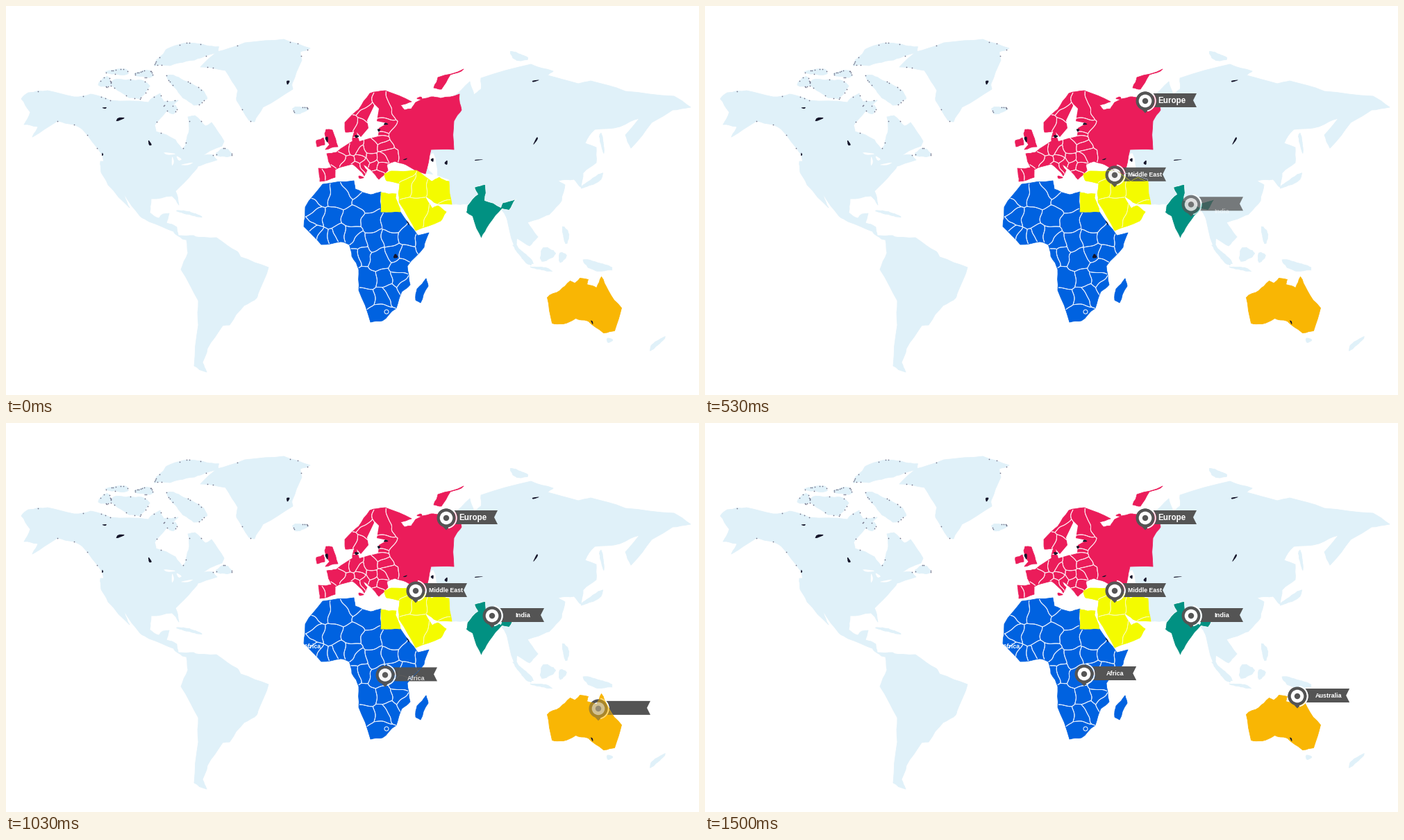
Animation, 998 px wide and 561 px high, one loop 5.01 s. Source, as a matplotlib script:

```python
import random

import matplotlib.pyplot as plt
import numpy as np
from matplotlib.animation import FuncAnimation
from matplotlib.collections import LineCollection, PolyCollection
from matplotlib.patches import Circle, Polygon
from matplotlib.path import Path
from matplotlib.transforms import Affine2D

W, H, DPI = 998, 561, 128
LOOP_MS, STEP_MS = 5010, 30
RISE_MS, RISE_PX, STAGGER = 480, 35, 124
PT = 72 / DPI
PALE, RED, BLUE, YELLOW = "#e0f1f9", "#eb1c5a", "#0062e0", "#f4fb00"
TEAL, AMBER, GREY, DARK = "#019182", "#f9b604", "#545454", "#15152a"
random.seed(4)

# Coastlines, in pixels with y pointing down
CANADA = [
    (22, 134), (32, 125), (60, 122), (98, 131), (122, 127), (150, 136), (205, 139),
    (222, 126), (227, 138), (248, 136), (230, 153), (214, 172), (216, 181),
    (244, 193), (254, 207), (258, 202), (263, 183), (262, 160), (272, 158),
    (287, 173), (296, 168), (314, 195), (311, 202), (278, 217), (298, 215),
    (304, 222), (272, 232), (140, 232), (138, 214), (110, 178), (98, 171),
    (74, 166), (38, 189), (46, 174), (26, 171), (35, 153)]
MEXICO = [
    (136, 224), (280, 226), (268, 242), (244, 267), (249, 287), (239, 274),
    (209, 278), (207, 298), (220, 306), (226, 300), (235, 299), (231, 313),
    (246, 319), (248, 331), (270, 331), (276, 336), (254, 336), (241, 325),
    (206, 311), (193, 303), (170, 271), (178, 291), (147, 258), (137, 240)]
SOUTH_AMERICA = [
    (260, 338), (268, 332), (303, 334), (333, 354), (338, 362), (378, 377),
    (365, 410), (361, 421), (343, 432), (322, 460), (312, 461), (290, 494),
    (283, 514), (289, 528), (271, 519), (277, 460), (277, 425), (252, 380),
    (262, 356)]
GREENLAND = [
    (280, 88), (304, 66), (344, 53), (400, 48), (438, 61), (424, 66), (426, 78),
    (412, 112), (413, 120), (370, 146), (358, 167), (350, 165), (332, 136),
    (334, 122), (316, 93)]
ASIA = [
    (645, 130), (668, 109), (674, 128), (684, 120), (684, 104), (756, 84),
    (788, 94), (780, 100), (824, 112), (842, 108), (892, 123), (962, 130),
    (986, 146), (960, 150), (930, 168), (900, 205), (892, 186), (912, 162),
    (884, 174), (848, 178), (834, 198), (850, 204), (850, 226), (831, 241),
    (829, 262), (818, 250), (795, 252), (805, 258), (800, 281), (782, 301),
    (722, 306), (712, 292), (665, 286), (642, 286), (638, 250), (604, 241),
    (612, 206), (640, 206)]
INDOCHINA = [
    (718, 296), (782, 300), (751, 312), (766, 333), (754, 346), (736, 335),
    (735, 344), (746, 366), (732, 346)]
EUROPE = [
    (489, 182), (488, 168), (508, 149), (524, 126), (546, 122), (584, 138),
    (568, 143), (574, 150), (584, 148), (590, 139), (612, 131), (626, 133),
    (653, 127), (656, 150), (645, 166), (645, 207), (612, 207), (604, 242),
    (576, 229), (560, 224), (549, 228), (550, 237), (537, 250), (526, 237),
    (511, 225), (520, 237), (516, 245), (499, 228), (474, 236), (474, 247),
    (452, 253), (450, 234), (469, 233), (462, 213), (476, 211), (499, 195),
    (502, 180)]
BALTIC = [
    (531, 142), (537, 148), (534, 166), (549, 169), (537, 176), (536, 187),
    (509, 195), (505, 182), (511, 189), (522, 176), (520, 165)]
BRITAIN = [(461, 178), (470, 179), (478, 203), (460, 207), (466, 200), (459, 184)]
IRELAND = [(447, 194), (457, 190), (459, 200), (448, 203)]
ARCTIC_RED = [(616, 118), (622, 103), (659, 91), (640, 99), (627, 120)]
AFRICA = [
    (456, 257), (501, 252), (503, 264), (525, 272), (540, 268), (540, 297),
    (568, 297), (593, 331), (609, 327), (602, 348), (578, 375), (582, 402),
    (570, 412), (562, 436), (542, 454), (525, 456), (508, 410), (508, 380),
    (498, 361), (494, 344), (482, 340), (454, 344), (429, 318), (431, 290)]
MADAGASCAR = [(605, 393), (608, 404), (597, 428), (590, 424), (592, 408)]
MIDDLE_EAST = [
    (545, 242), (555, 238), (591, 237), (613, 253), (624, 247), (638, 253),
    (642, 286), (621, 285), (603, 273), (614, 292), (622, 288), (634, 297),
    (626, 310), (590, 324), (566, 283), (567, 256), (548, 252)]
EGYPT = [(540, 269), (562, 271), (561, 277), (568, 297), (540, 297)]
INDIA = [
    (674, 261), (690, 257), (689, 280), (712, 290), (715, 283), (734, 278),
    (724, 294), (714, 292), (696, 314), (684, 335), (671, 303), (662, 297),
    (664, 287), (679, 271)]
AUSTRALIA = [
    (779, 420), (797, 410), (812, 396), (819, 399), (826, 392), (838, 394),
    (836, 401), (850, 406), (857, 390), (867, 410), (886, 435), (876, 468),
    (860, 471), (838, 454), (820, 450), (802, 458), (786, 457)]

# Small islands: x, y, half width, half height, tilt in degrees
ISLANDS = [
    (258, 69, 46, 13, -12), (262, 122, 32, 12, 35), (180, 118, 27, 13, 10),
    (143, 110, 9, 7, -20), (200, 98, 13, 5, 0), (162, 95, 16, 4, 0),
    (237, 148, 10, 6, 15), (314, 212, 11, 6, 0), (423, 150, 11, 5, -5),
    (264, 299, 18, 2, 14), (738, 73, 13, 5, 20), (858, 196, 2, 14, -10),
    (846, 252, 18, 4, -32), (806, 330, 4, 12, -10), (746, 361, 19, 4, 45),
    (779, 358, 11, 9, -30), (801, 362, 5, 7, 20), (772, 379, 15, 2, 10),
    (851, 375, 21, 6, 15), (937, 487, 14, 3, -40), (869, 482, 4, 3, 0)]
# Dark lakes: x, y, half width, half height, tilt in degrees
LAKES = [
    (164, 163, 6, 2, -18), (207, 198, 1.7, 4, -25), (142, 147, 3, 1, 0),
    (139, 214, 1, 2, 0), (406, 110, 2, 3, 20), (762, 108, 5, 1, -12),
    (763, 194, 1.2, 6, 30), (614, 222, 2, 2.5, 0), (634, 226, 2, 3, 15),
    (680, 222, 6, .6, -5), (575, 221, 3, .8, -20), (462, 192, 2, 4, -10),
    (505, 188, 3, 2, 0), (537, 179, 2, 2, 0), (547, 170, 3, 1.5, 0),
    (561, 361, 3, 3, 30), (844, 456, 1, 3, -25), (579, 313, .8, 4, -30)]

# Country centres; borders run halfway between neighbours
AFRICAN = [
    (452, 272), (438, 290), (480, 276), (503, 259), (520, 282), (446, 304),
    (468, 306), (500, 306), (526, 312), (556, 314), (434, 317), (442, 329),
    (459, 336), (470, 335), (479, 330), (496, 330), (508, 342), (530, 338),
    (554, 336), (578, 336), (600, 340), (577, 356), (560, 354), (503, 360),
    (513, 358), (538, 366), (569, 376), (520, 394), (546, 394), (565, 394),
    (574, 404), (555, 411), (541, 419), (519, 420), (538, 442)]
EUROPEAN = [
    (452, 243), (463, 241), (480, 220), (503, 206), (525, 205), (511, 213),
    (509, 221), (503, 232), (525, 219), (541, 222), (551, 214), (546, 201),
    (541, 192), (541, 185), (542, 178), (492, 224), (488, 207), (541, 232),
    (533, 243), (531, 229), (518, 226), (496, 170), (510, 144), (510, 176),
    (519, 154), (543, 148)]
RUSSIAN = [(564, 140), (564, 190), (580, 217)]
GULF = [(568, 245), (578, 259), (592, 262), (620, 265), (590, 290), (625, 302)]


def rough(points):
    """Add jittered midpoints twice and wind the outline one way."""
    pts = np.array(points, float)
    for limit in (1.4, 0.7):
        nxt = np.roll(pts, -1, axis=0)
        reach = np.minimum(0.07 * np.hypot(*(nxt - pts).T), limit)
        mids = [(p + q) / 2 + [random.uniform(-r, r) for _ in "xy"]
                for p, q, r in zip(pts, nxt, reach)]
        pts = np.stack([pts, mids], axis=1).reshape(-1, 2)
    nxt = np.roll(pts, -1, axis=0)
    area = np.sum(pts[:, 0] * nxt[:, 1] - nxt[:, 0] * pts[:, 1])
    return pts if area > 0 else pts[::-1]


def blob(x, y, rx, ry, tilt):
    a = np.linspace(0, 2 * np.pi, 12, endpoint=False)
    wobble = 1 + 0.2 * np.sin(3 * a + x)
    shape = np.column_stack([rx * wobble * np.cos(a), ry * wobble * np.sin(a)])
    return Affine2D().rotate_deg(tilt).translate(x, y).transform(shape)


fig = plt.figure(figsize=(W / DPI, H / DPI), dpi=DPI, facecolor="white")
ax = fig.add_axes([0, 0, 1, 1])
ax.set(xlim=(0, W), ylim=(H, 0))
ax.axis("off")

coasts = []


def region(shapes, color, edge=None, z=3):
    outlines = [rough(s) for s in shapes]
    coasts.extend(outlines)
    ax.add_collection(PolyCollection(outlines, facecolor=color, zorder=z,
                                     edgecolor=edge or color, lw=0.8 * PT))
    return outlines


def patch_over(shapes, color, z):
    ax.add_collection(PolyCollection(shapes, facecolor=color, zorder=z))


def borders(countries, outline, color, width=1.0):
    """Trace wavy halfway lines between groups of centres inside an outline."""
    (x0, y0), (x1, y1) = outline.min(axis=0), outline.max(axis=0)
    gx, gy = np.meshgrid(np.arange(x0, x1), np.arange(y0, y1))
    inside = Path(outline).contains_points(
        np.column_stack([gx.ravel(), gy.ravel()])).reshape(gx.shape)
    wx = gx + 1.3 * np.sin(gy / 4) + 0.7 * np.sin(gx / 2.3)
    wy = gy + 1.3 * np.sin(gx / 5) + 0.7 * np.sin(gy / 2.1)
    dist = np.array([np.min([np.hypot(wx - x, wy - y) for x, y in group], axis=0)
                     for group in countries])
    lines = []
    for i, own in enumerate(dist):
        gap = own - np.delete(dist, i, axis=0).min(axis=0)
        if not (gap[inside] < 0).any():
            continue
        traced = ax.contour(gx, gy, np.where(inside, gap, np.nan), levels=[0])
        lines += [seg for seg in traced.allsegs[0] if len(seg) > 1]
        traced.remove()
    ax.add_collection(LineCollection(lines, color=color, lw=width * PT, zorder=3.2))


region([CANADA, MEXICO, SOUTH_AMERICA, GREENLAND, ASIA, INDOCHINA]
       + [blob(*k) for k in ISLANDS], PALE, z=2)
arctic = [p for c in coasts for p in c if p[0] < 450 and 50 < p[1] < 220]
patch_over([blob(614, 229, 7, 16, -10)], "white", 2.5)
europe = region([EUROPE, BRITAIN, IRELAND, ARCTIC_RED], RED)[0]
patch_over([BALTIC, blob(499, 241, 1.5, 4, 0)], "white", 3.5)
patch_over([blob(511, 247, 4, 2, 10), blob(596, 133, 4, 2, 0)], RED, 3.5)
africa = region([AFRICA, MADAGASCAR], BLUE)[0]
gulf = region([MIDDLE_EAST, EGYPT], YELLOW)[0]
region([INDIA], TEAL, "white")
region([AUSTRALIA], AMBER)
borders([[c] for c in AFRICAN], africa, "#e4efff")
borders([[c] for c in EUROPEAN] + [RUSSIAN], europe, "#ffe3ec")
borders([[c] for c in GULF], gulf, "#fcfec0", 0.8)

# Great Lakes, coastal specks, dark lakes
patch_over([blob(235, 213, 8, 1.5, 5), blob(240, 224, 1.5, 6, 0),
            blob(249, 220, 4, 2, 40), blob(261, 228, 8, 1.3, -10)], "white", 4)
specks = np.array(random.sample(arctic, 110))
ax.scatter(*specks.T, s=0.9, color="#74748a", lw=0, zorder=4)
patch_over([blob(*k) for k in LAKES], DARK, 4)
ax.add_patch(Circle((548, 441), 3, fc=BLUE, ec="white", lw=PT, zorder=4))

land = Path.make_compound_path(*[Path(np.vstack([c, c[:1]]), closed=True)
                                 for c in coasts])
risers = []


def add_riser(step, make):
    """Register the artists from make(transform) as one rising, fading group."""
    shift = Affine2D()
    over, under = make(shift + ax.transData)
    risers.append((30 + step * STAGGER, shift, over, under))


def pin_shapes(x, y, right, mid, trans, z):
    a = np.radians(np.linspace(110, 430, 60))
    drop = np.vstack([np.column_stack([x + 13.5 * np.cos(a), y + 13.5 * np.sin(a)]),
                      [(x, y + 17.5)]])
    top, bottom = mid - 10, mid + 10
    sweep = np.linspace(top, bottom, 12)
    inner = x + np.sqrt(np.maximum(15.8 ** 2 - (sweep - y) ** 2, 0))
    banner = np.vstack([np.column_stack([inner, sweep]),
                        [(right, bottom), (right - 5, mid), (right, top)]])
    patches = [Polygon(banner, fc=GREY), Polygon(drop, fc=GREY),
               Circle((x, y), 9.3, fc="white"), Circle((x, y), 4.2, fc=GREY)]
    for patch in patches:
        patch.set(transform=trans, zorder=z, linewidth=0)
        ax.add_patch(patch)
    b = np.radians(np.linspace(-75, 75, 30))
    ring, = ax.plot(x + 14.7 * np.cos(b), y + 14.7 * np.sin(b), color="white",
                    lw=1.7 * PT, transform=trans, zorder=z)
    return patches + [ring]


def add_pin(step, *place):
    # Over open sea a pin is either solid or absent; over land it fades
    add_riser(step, lambda tr: (pin_shapes(*place, tr, 6),
                                pin_shapes(*place, tr, 1)))


def add_text(step, x, y, text, size):
    add_riser(step, lambda tr: ([ax.text(
        x, y, text, transform=tr, color="white", fontsize=size * PT, zorder=7,
        family="Liberation Sans", weight="bold", ha="center",
        va="center_baseline")], []))


LABELS = [  # pin step, pin x and y, banner right and middle, text step, text
    (0, 634, 137, 708, 136, 0, 672.5, "Europe", 11.6),
    (1, 590, 242, 664, 241, 1, 633.5, "Middle East", 8.7),
    (2, 700, 278, 775, 277, 3, 744.5, "India", 9.2),
    (5, 546, 362, 621, 361, 6, 590.5, "Africa", 9),
    (7, 853, 394, 928, 393, 8, 898, "Australia", 9)]
for step, x, y, right, mid, text_step, tx, text, size in LABELS:
    add_pin(step, x, y, right, mid)
    add_text(text_step, tx, mid - 0.5, text, size)
add_text(4, 441, 321, "Africa", 8.8)


def update(frame):
    now = (frame + 0.5) * STEP_MS
    for start, shift, over, under in risers:
        s = min(max((now - start) / RISE_MS, 0), 1)
        left = (1 - s) ** 2
        shift.clear().translate(0, RISE_PX * left)
        for artist in over:
            artist.set_visible(s > 0)
            artist.set_alpha(1 - left)
            if under and s < 1:
                artist.set_clip_path(land, ax.transData)
            else:
                artist.set_clip_path(None)
        for artist in under:
            artist.set_visible(left < 0.6)
    return []


anim = FuncAnimation(fig, update, frames=LOOP_MS // STEP_MS, interval=STEP_MS,
                     repeat=True, repeat_delay=0, blit=False)
plt.show()
```
